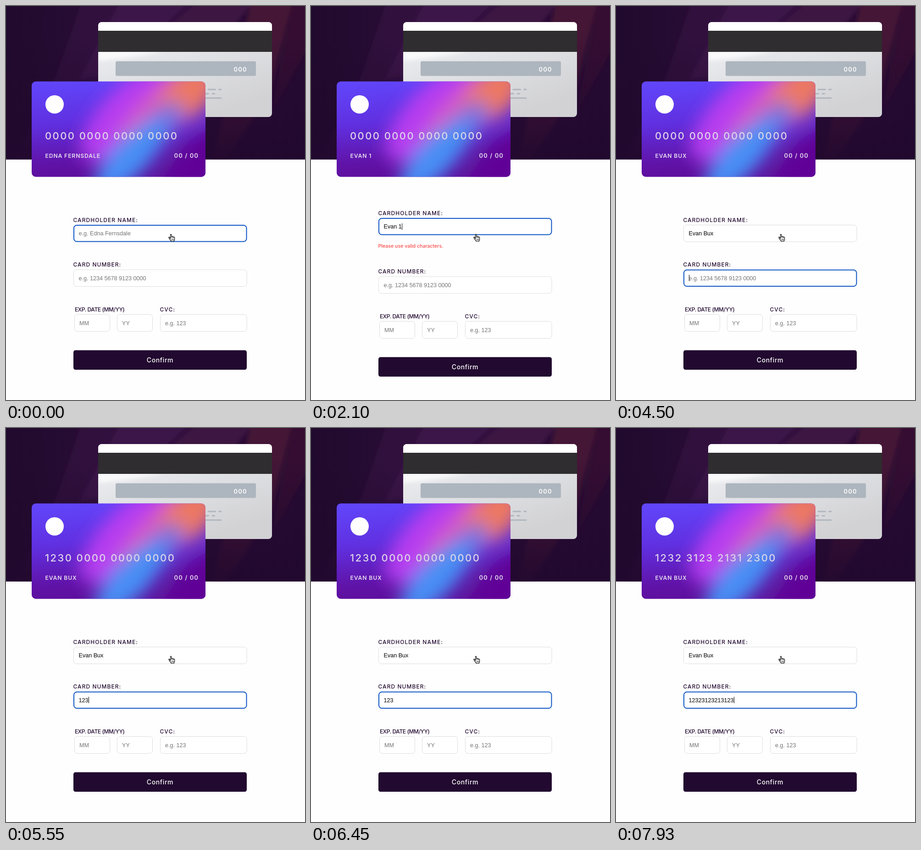
Recreate the animation shown at these times as an HTML page. Size 652x859 px, loop 8 s.

```html
<!DOCTYPE html>
<html lang="en">
<head>
<meta charset="utf-8">
<title>Card form</title>
<style>
  html, body { margin: 0; width: 100%; height: 100%; overflow: hidden; background: #fefefe; }
  svg { display: block; width: 652px; height: 859px; }
  text { font-family: Inter, Roboto, sans-serif; white-space: pre; }
  .label { font-size: 12px; font-weight: 500; letter-spacing: 1.05px; fill: #21092f; }
  .tight { letter-spacing: -.42px; }
  .value { font-family: "Liberation Sans", Arial, sans-serif; font-size: 12.6px; fill: #000; }
  .hint { fill: #757575; }
  .error { font-size: 10.6px; font-weight: 500; fill: #ff4a4a; }
  .small { font-size: 12.2px; font-weight: 600; letter-spacing: .85px; fill: #e6dff0; }
  .digits { font-size: 22px; font-weight: 500; letter-spacing: 2.4px; fill: #ddd6e8; }
  .box { fill: #fff; stroke: #dedddf; stroke-width: 1; }
  .focus { stroke: #1157c5; stroke-width: 2; }
</style>
</head>
<body>
<svg viewBox="0 0 652 859">
  <defs>
    <clipPath id="heroClip"><path d="M0 0H652V334.5H0Z"/></clipPath>
    <clipPath id="backClip"><rect x="201" y="35" width="379" height="207" rx="8"/></clipPath>
    <clipPath id="frontClip"><rect x="56" y="164.5" width="379" height="208" rx="9"/></clipPath>
    <linearGradient id="heroFill">
      <stop offset="0" stop-color="#200a2d"/>
      <stop offset=".45" stop-color="#2d0e3a"/>
      <stop offset="1" stop-color="#260b32"/>
    </linearGradient>
    <linearGradient id="heroShade" x1="0" y1="0" x2="0" y2="1">
      <stop offset=".2" stop-color="#21082e" stop-opacity="0"/>
      <stop offset="1" stop-color="#21082e" stop-opacity=".9"/>
    </linearGradient>
    <linearGradient id="backFill" x1="0" y1="0" x2=".6" y2="1">
      <stop offset=".25" stop-color="#ebecef"/>
      <stop offset=".6" stop-color="#dedfe2"/>
      <stop offset="1" stop-color="#d2d2d5"/>
    </linearGradient>
    <linearGradient id="frontFill" x1="0" y1="0" x2=".15" y2="1">
      <stop offset="0" stop-color="#6147fc"/>
      <stop offset=".45" stop-color="#6030e0"/>
      <stop offset=".85" stop-color="#6013a8"/>
      <stop offset="1" stop-color="#5e0f9e"/>
    </linearGradient>
    <filter id="soft" x="-60%" y="-60%" width="220%" height="220%"><feGaussianBlur stdDeviation="19"/></filter>
    <filter id="haze" x="-20%" y="-20%" width="140%" height="140%"><feGaussianBlur stdDeviation="5"/></filter>
  </defs>

  <g clip-path="url(#heroClip)">
    <rect width="652" height="335" fill="url(#heroFill)"/>
    <g filter="url(#haze)">
      <path d="M165 -10H520L330 200L150 335H20L110 150Z" fill="#351242" opacity=".65"/>
      <path d="M250 -10H400L225 150L160 160Z" fill="#421a4c" opacity=".7"/>
      <path d="M420 -10H540L500 40H360Z" fill="#3d1543"/>
      <path d="M535 -10H625L575 190L480 335H450Z" fill="#4a1938" opacity=".85"/>
      <path d="M625 -10H670V70L580 230Z" fill="#351032"/>
    </g>
    <rect width="652" height="335" fill="url(#heroShade)"/>
  </g>

  <g clip-path="url(#backClip)">
    <rect x="201" y="35" width="379" height="207" fill="url(#backFill)"/>
    <path d="M201 98H345Q285 111 201 119Z" fill="#fafafb" filter="url(#haze)"/>
    <path d="M201 35H580V54H201Z" fill="#fff"/>
    <path d="M201 54H580V100H201Z" fill="#2f2d2f"/>
  </g>
  <rect x="239" y="120.5" width="306" height="32" rx="3" fill="#adb5be"/>
  <text class="small" x="496.5" y="143" style="font-size:13px;letter-spacing:1.2px;fill:#fff">000</text>
  <path d="M441 182H456.500M464.500 182H469M430 191.300H441.500M450 191.300H454.500M430 200.700H469"
    stroke="#b0b6be" stroke-width="3" stroke-linecap="round"/>

  <g clip-path="url(#frontClip)">
    <rect x="56" y="164" width="379" height="209" fill="url(#frontFill)"/>
    <g id="glow" filter="url(#soft)"></g>
  </g>
  <circle cx="106" cy="214.500" r="20" fill="#fff"/>
  <text class="digits" id="cardNumber" x="85" y="291"></text>
  <text class="small" id="cardName" x="85.500" y="331"></text>
  <text class="small" x="366.500" y="331" style="font-size:13px;letter-spacing:1.1px">00 / 00</text>

  <g id="nameGroup">
    <text class="label" x="146.500" y="471">CARDHOLDER NAME:</text>
    <rect class="box" id="nameBox"/>
    <text class="value" id="nameValue" x="158.500" y="500"></text>
  </g>
  <text class="error" id="nameError" x="146.500" y="526.500">Please use valid characters.</text>

  <g id="numberGroup">
    <text class="label" x="146.500" y="568">CARD NUMBER:</text>
    <rect class="box" id="numberBox"/>
    <text class="value" id="numberValue" x="158.500" y="597.500"></text>
  </g>
  <text class="error" id="numberError" x="146.500" y="624">Wrong format, numbers only.</text>

  <g id="rest">
    <text class="label tight" x="150" y="665.500">EXP. DATE (MM/YY)</text>
    <text class="label" x="335.500" y="665.500">CVC:</text>
    <rect class="box" x="149.500" y="672.500" width="77" height="37" rx="6"/>
    <rect class="box" x="242.500" y="672.500" width="77" height="37" rx="6"/>
    <rect class="box" x="336.500" y="672.500" width="188.500" height="37" rx="6"/>
    <text class="value hint" x="160" y="695.500">MM</text>
    <text class="value hint" x="253" y="695.500">YY</text>
    <text class="value hint" x="347" y="695.500">e.g. 123</text>
    <rect x="147" y="750.500" width="378" height="42.500" rx="4.500" fill="#21092f"/>
    <text x="336" y="777" text-anchor="middle" font-size="14" font-weight="500" letter-spacing=".6" fill="#fff">Confirm</text>
  </g>

  <rect id="caret" width="1" height="14" fill="#000"/>

  <g transform="translate(354 497)" stroke="#000" stroke-linejoin="round" stroke-linecap="round">
    <path d="M4.500 10.500V1.800Q4.500 .6 5.600 .6T6.800 1.800V6Q7 4.900 8 5T9.200 6.200Q9.700 5.500 10.500 5.800T11.500 7Q12 6.400 12.800 6.800T13.700 8V11.500Q13.700 13.300 12.500 14.500V16H5.800V14.500Q3.800 12.800 2.800 10.900L1 8.300Q.5 7.200 1.500 6.900T3.300 7.600Z" fill="#fff" stroke-width="1.100"/>
    <path d="M6.800 6V8.500M9.200 6.200V8.500M11.500 7V9M7.500 11V13.500M9.500 11V13.500M11.500 11V13.500" fill="none" stroke-width=".8"/>
  </g>
</svg>
<script>
const LOOP = 8000, SHIFT = 15;
const HOLDER = "Edna Fernsdale", PERSON = "Evan Bux", DIGITS = "12323123213123";
const $ = id => document.getElementById(id);
const name = n => PERSON.slice(0, n);
const digits = n => DIGITS.slice(0, n);

// Colour clouds of the front card: x, y, rx, ry, fill
const clouds = [
  [262, 232, 135, 52, "#b73df0"],
  [325, 228, 125, 34, "#d75cbe"],
  [398, 190, 78, 46, "#ed7862"],
  [335, 262, 70, 30, "#7c72dc"],
  [272, 328, 108, 40, "#478ff4"],
  [425, 346, 105, 46, "#600596"]
];
$("glow").innerHTML = clouds.map(([x, y, rx, ry, fill]) =>
  `<ellipse rx="${rx}" ry="${ry}" fill="${fill}" transform="translate(${x} ${y}) rotate(-47)"/>`).join("");

// Typing: start time, text, caret hidden
const nameKeys = [
  [0, "", true], [150, ""], [600, name(1)], [900, name(2)], [1200, name(3)],
  [1500, name(4)], [1650, name(5)], [2100, name(5) + "1"], [2550, name(5) + "123"],
  [3000, name(5) + "123", true], [3150, name(5) + "12"], [3300, name(5) + "1"],
  [3600, name(5)], [3900, name(6)], [4050, name(7)], [4200, name(8)]
];
const numberKeys = [
  [0, ""], [5100, "", true], [5250, digits(1)], [5400, digits(2)], [5550, digits(3)],
  [5850, digits(3) + "a"], [6300, digits(3)], [6450, digits(3), true], [6750, digits(4)],
  ...[5, 7, 8, 10, 11, 13, 14].map((n, i) => [7040 + i * 890 / 6, digits(n)])
];
const NUMBER_FOCUS = 4500;

const keyAt = (keys, t) => keys.findLast(k => k[0] <= t);
const move = (id, dy) => $(id).setAttribute("transform", `translate(0 ${dy})`);
const show = (id, on) => $(id).setAttribute("visibility", on ? "visible" : "hidden");

function setText(id, text) {
  if ($(id).textContent !== text) $(id).textContent = text;
}

function setField(id, y, text, hint, focused) {
  const inset = focused ? 1 : .5;
  const attrs = { x: 147 + inset, y: y + inset, width: 378.5 - 2 * inset, height: 37.5 - 2 * inset, rx: 6.5 };
  for (const key in attrs) $(id + "Box").setAttribute(key, attrs[key]);
  $(id + "Box").classList.toggle("focus", focused);
  $(id + "Value").classList.toggle("hint", !text);
  setText(id + "Value", text || hint);
}

function render(t) {
  const [, holder, nameOff] = keyAt(nameKeys, t);
  const [, number, numberOff] = keyAt(numberKeys, t);
  const onNumber = t >= NUMBER_FOCUS;
  const badName = /\d/.test(holder), badNumber = /\D/.test(number);

  setField("name", 477, holder, "e.g. " + HOLDER, !onNumber);
  setField("number", 574.5, number, "e.g. 1234 5678 9123 0000", onNumber);
  setText("cardName", (holder || HOLDER).toUpperCase());
  setText("cardNumber", number.padEnd(16, "0").match(/.{4}/g).join(" ").toUpperCase());

  const nameShift = badName || badNumber ? -SHIFT : 0;
  const numberShift = badName ? SHIFT : badNumber ? -SHIFT : 0;
  move("nameGroup", nameShift);
  move("numberGroup", numberShift);
  move("rest", badName || badNumber ? SHIFT : 0);
  show("nameError", badName);
  show("numberError", badNumber);

  const text = onNumber ? number : holder;
  const width = text ? $(onNumber ? "numberValue" : "nameValue").getComputedTextLength() : 0;
  $("caret").setAttribute("x", Math.round(158.5 + width));
  $("caret").setAttribute("y", onNumber ? 586 + numberShift : 489 + nameShift);
  show("caret", !(onNumber ? numberOff : nameOff));
}

const start = performance.now();
function tick() {
  render((performance.now() - start) % LOOP);
  requestAnimationFrame(tick);
}
tick();
</script>
</body>
</html>
```
